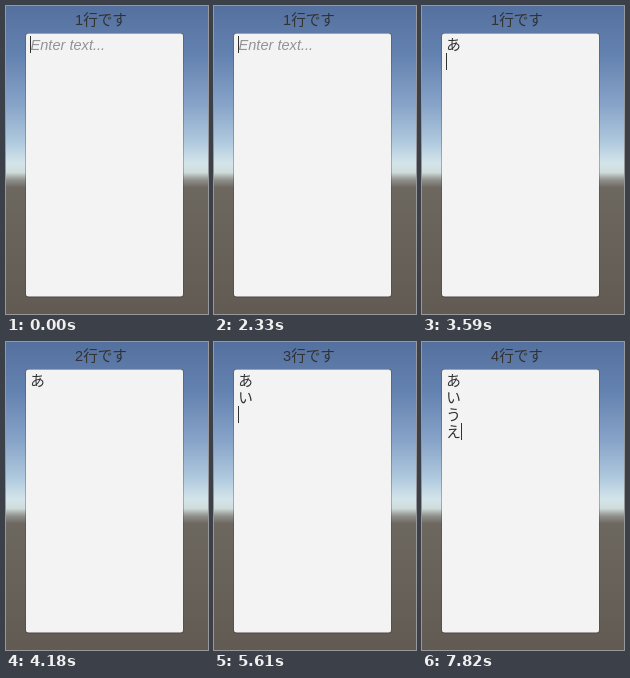
An HTML page that plays this animation: 202 by 308 pixels, repeating every 8 s.

```html
<!DOCTYPE html>
<html lang="ja">
<head>
<meta charset="utf-8">
<title>Line counter</title>
<style>
  html, body { margin: 0; width: 100%; height: 100%; overflow: hidden; background: #625b53; }
  svg { display: block; width: 202px; height: 308px; }
  text { font: 14.6px "Liberation Sans", "Noto Sans CJK JP", "Noto Sans CJK", sans-serif; fill: #323232; }
  .kana, .label { font-weight: 500; }
  .hint { font-style: italic; fill: #949494; }
</style>
</head>
<body>
<svg viewBox="0 0 202 308">
  <defs>
    <linearGradient id="sky" x1="0" y1="0" x2="0" y2="1">
      <stop offset="0" stop-color="#54709f"/>
      <stop offset=".16" stop-color="#6482b0"/>
      <stop offset=".32" stop-color="#87a3c8"/>
      <stop offset=".44" stop-color="#afc8de"/>
      <stop offset=".51" stop-color="#d3e5ea"/>
      <stop offset=".54" stop-color="#d0dcdc"/>
      <stop offset=".565" stop-color="#8f908c"/>
      <stop offset=".59" stop-color="#6c675f"/>
      <stop offset="1" stop-color="#625b53"/>
    </linearGradient>
  </defs>
  <rect width="202" height="308" fill="url(#sky)"/>
  <rect x="19.5" y="27" width="158" height="264.5" rx="3" fill="#3c3c3c" fill-opacity=".65"/>
  <rect x="20" y="27.5" width="157" height="263" rx="2.5" fill="#f3f3f3"/>
  <text class="label" x="69" y="18.7"><tspan id="count">1</tspan>行です</text>
  <text class="hint" id="hint" x="24.5" y="44">Enter text...</text>
  <g id="lines"></g>
  <rect id="caret" y="30" width="1" height="17" fill="#323232" shape-rendering="crispEdges"/>
</svg>
<script>
  const LOOP = 8000, PITCH = 17, LEFT = 24, AFTER = 39;
  const $ = id => document.getElementById(id);

  // Each entry: [start ms, caret visible, typed text, line count]
  const states = [
    [0, 1, "", 1], [540, 0, "", 1], [1130, 1, "", 1], [1730, 0, "", 1], [2330, 1, "", 1],
    [2690, 1, "あ", 1], [3590, 1, "あ\n", 1], [3640, 1, "あ\n", 2],
    [4180, 0, "あ\n", 2], [4770, 1, "あ\n", 2], [4830, 1, "あ\nい", 2],
    [5610, 1, "あ\nい\n", 3], [6030, 1, "あ\nい\nう", 3], [7050, 0, "あ\nい\nう", 3],
    [7340, 1, "あ\nい\nう\n", 4], [7820, 1, "あ\nい\nう\nえ", 4]
  ];

  const rows = [..."あいうえ"].map((kana, i) => {
    const row = document.createElementNS("http://www.w3.org/2000/svg", "text");
    row.setAttribute("class", "kana");
    row.setAttribute("x", LEFT + 0.3);
    row.setAttribute("y", 43.8 + i * PITCH);
    row.textContent = kana;
    return $("lines").appendChild(row);
  });

  function show([, visible, typed, count]) {
    const lines = typed.split("\n"), last = lines.length - 1;
    rows.forEach((row, i) => row.setAttribute("visibility", lines[i] ? "visible" : "hidden"));
    $("hint").setAttribute("visibility", typed ? "hidden" : "visible");
    $("count").textContent = count;
    $("caret").setAttribute("x", lines[last] ? AFTER : LEFT);
    $("caret").setAttribute("y", 30 + last * PITCH);
    $("caret").setAttribute("visibility", visible ? "visible" : "hidden");
  }

  let shown;
  function draw() {
    const t = performance.now() % LOOP;
    const state = states.findLast(s => s[0] <= t);
    if (state !== shown) show(shown = state);
    requestAnimationFrame(draw);
  }
  draw();
</script>
</body>
</html>
```
